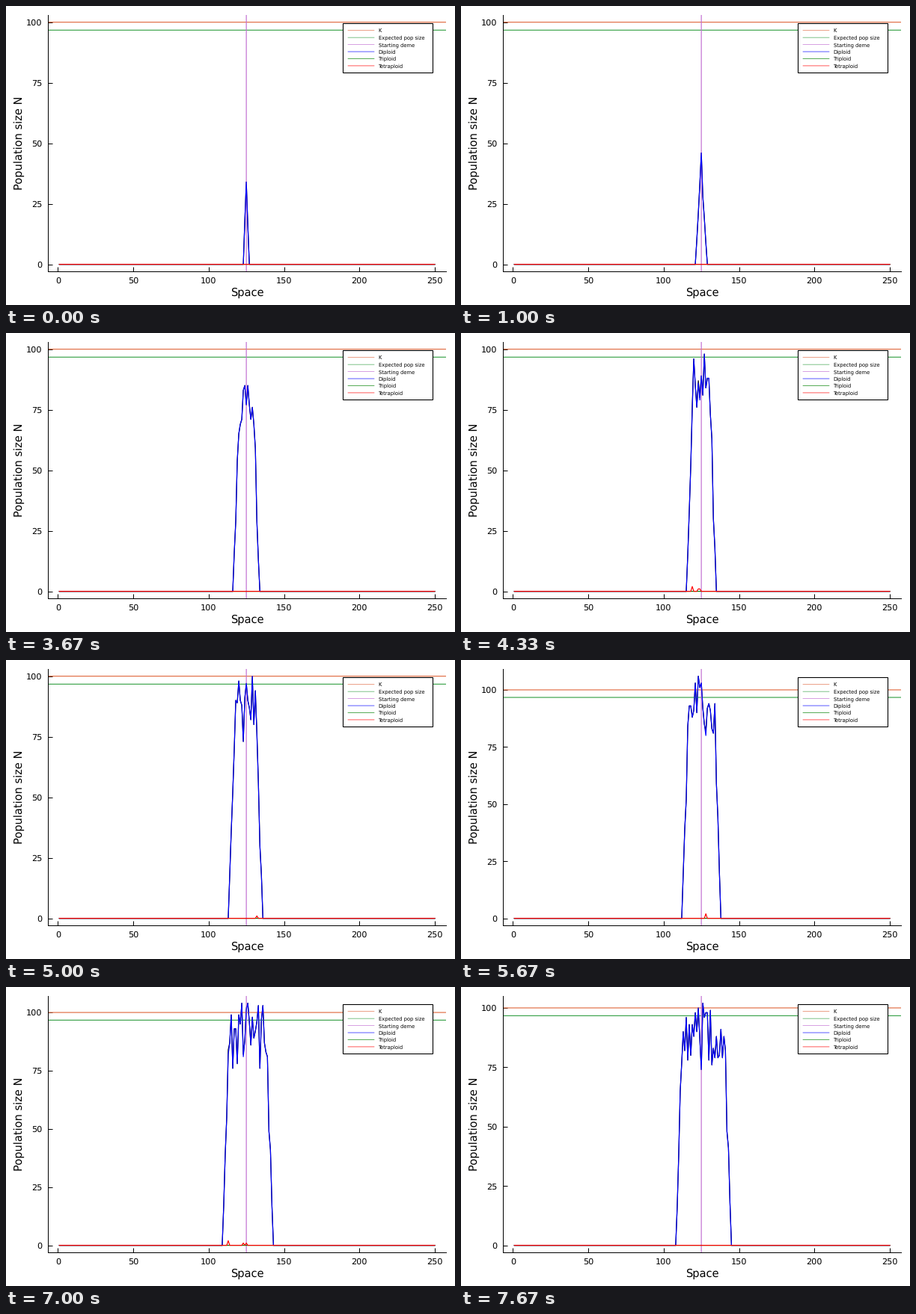
Recreate the animation shown at these times as a matplotlib script. Size 600 by 400 pixels, loop 8000 ms.

```python
import matplotlib.pyplot as plt
import numpy as np
from matplotlib.animation import FuncAnimation
from matplotlib.patches import Rectangle

W, H, DPI = 600, 400, 100
GENERATIONS, LOOP_MS, TICK_MS = 24, 8000, 40
HOLD_MS = LOOP_MS / GENERATIONS
PX = 72 / DPI
CAPACITY, EXPECTED, START = 100, 96.7, 125
ORANGE, GREEN, PURPLE = "#e26f46", "#3da44d", "#c271d2"
plt.rcParams.update({"font.family": "DejaVu Sans", "text.hinting": "none",
                     "lines.linewidth": 1.2 * PX})
space = np.arange(1, 251)


def peak_size(k):
    """Growth up to the carrying capacity, then a swing around it."""
    growth = np.interp(k, (0, 3, 7, 11, 13, 14), (34, 46, 96, 85, 98, 110))
    swing = 102.5 - 3 * np.cos(2 * np.pi * (k - 15.25) / 3.5)
    return round(min(growth, swing))


def generation(k):
    """Diploid and tetraploid counts in every deme at generation k."""
    rng = np.random.default_rng(k)
    lo = round(123 - 15 * k / 23)
    hi = round(np.interp(k, (0, 7, 15, 23), (127, 132, 136, 145)))
    edge = np.minimum(space - lo, hi - space)
    front = np.clip(edge / min(4.5, (hi - lo) / 2), 0, 1) ** 1.1
    noisy = front * rng.uniform(0.72, 1, space.size)
    diploid = np.round(noisy / noisy.max() * peak_size(k))
    tetraploid = np.zeros(space.size)
    if k > 4:
        demes = rng.integers(lo + 3, hi - 3, rng.integers(0, 4))
        tetraploid[demes - 1] = rng.integers(1, 3, demes.size)
    return diploid, tetraploid


fig = plt.figure(figsize=(W / DPI, H / DPI), dpi=DPI, facecolor="white")
ax = fig.add_axes([56.3 / W, 1 - 355.3 / H, 531.7 / W, 343.4 / H])
ax.set_xlim(1 - 0.03 * 249, 250 + 0.03 * 249)
ax.set_xticks(range(0, 251, 50))
ax.set_yticks(range(0, 101, 25))
ax.spines[["top", "right"]].set_visible(False)
ax.spines[["left", "bottom"]].set_linewidth(PX)
ax.tick_params(direction="in", length=6 * PX, width=PX, labelsize=11.3 * PX)
ax.tick_params(axis="x", pad=7 * PX)
ax.tick_params(axis="y", pad=8 * PX)


def series(color, zorder):
    return ax.plot(space, 0 * space, color=color, zorder=zorder,
                   snap=False)[0]


total_line = series("black", 2)
ax.axhline(CAPACITY, color=ORANGE, zorder=2.1, snap=False)
ax.axhline(EXPECTED, color=GREEN, zorder=2.2, snap=False)
ax.axvline(START, color=PURPLE, zorder=2.3, snap=False)
diploid_line = series("blue", 2.4)
series("green", 2.5)
tetraploid_line = series("red", 2.6)

centered = dict(fontsize=14.6 * PX, ha="center", va="center")
fig.text(322 / W, 1 - 384 / H, "Space", **centered)
fig.text(17.5 / W, 1 - 183.5 / H, "Population size N", rotation=90,
         **centered)

# Legend in stage pixels, y pointing down.
key = fig.add_axes([0, 0, 1, 1], zorder=5)
key.set(xlim=(0, W), ylim=(H, 0))
key.axis("off")
key.add_patch(Rectangle((450.3, 23.2), 120, 66, fc="white", ec="black",
                        lw=1.1 * PX))
ENTRIES = [("K", ORANGE), ("Expected pop size", GREEN),
           ("Starting deme", PURPLE), ("Diploid", "blue"),
           ("Triploid", "green"), ("Tetraploid", "red")]
for i, (name, color) in enumerate(ENTRIES):
    y = 32.7 + 9.45 * i
    key.plot([457, 492], [y, y], color=color, lw=0.65 * PX, snap=False)
    key.text(497.5, y + 2.5, name, fontsize=6.75 * PX, va="baseline")


def update(frame):
    # Each generation begins at the last tick before its turn.
    k = int((frame * TICK_MS + 30) / HOLD_MS)
    diploid, tetraploid = generation(k)
    total_line.set_ydata(diploid + tetraploid)
    diploid_line.set_ydata(diploid)
    tetraploid_line.set_ydata(tetraploid)
    top = max(CAPACITY, (diploid + tetraploid).max())
    ax.set_ylim(-0.03 * top, 1.03 * top)
    return total_line, diploid_line, tetraploid_line


anim = FuncAnimation(fig, update, frames=LOOP_MS // TICK_MS,
                     interval=TICK_MS, repeat=True, repeat_delay=0,
                     blit=False)
plt.show()
```
